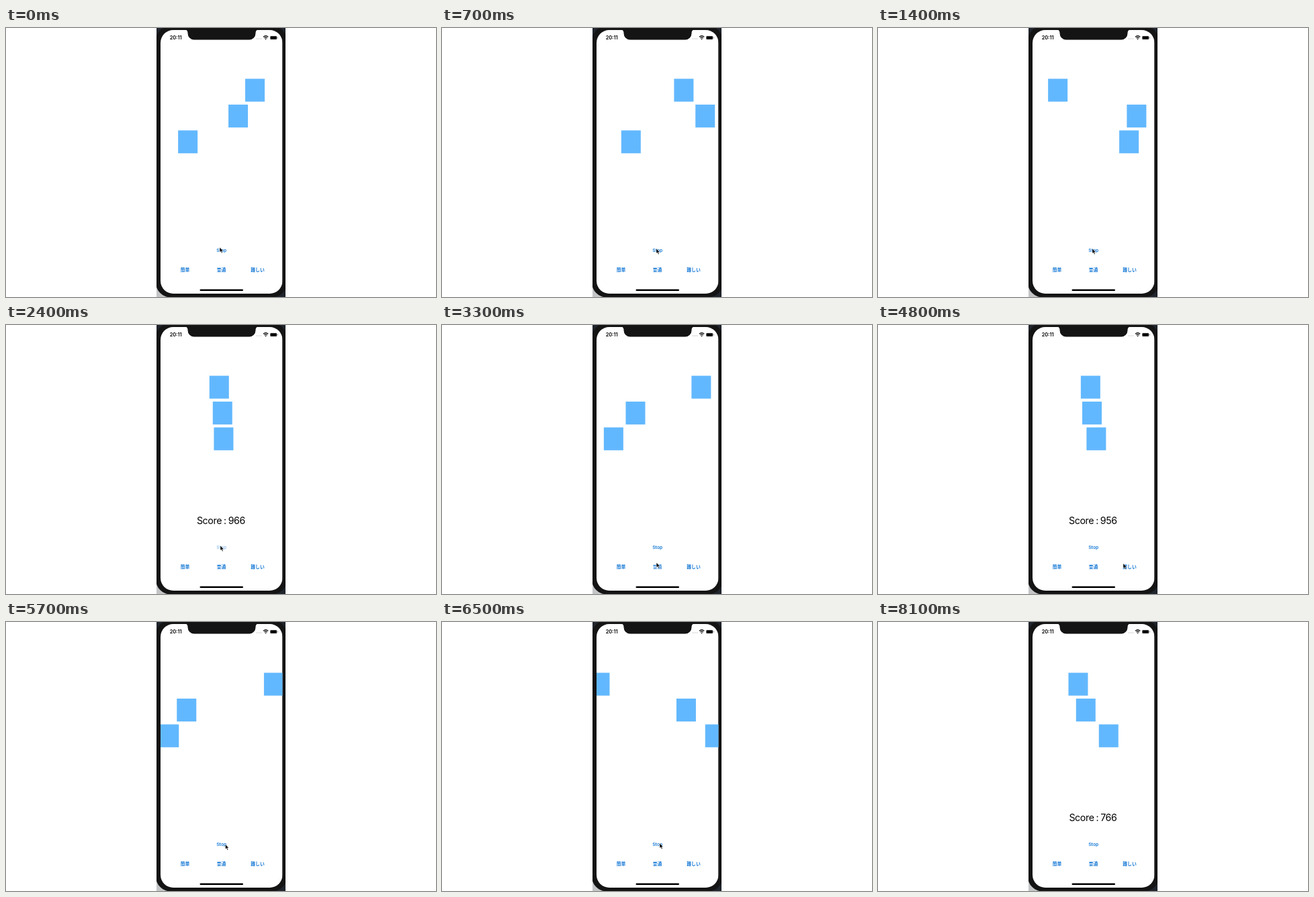
Write an HTML page that moves like this. It is 640 by 400 pixels and loops after 9 s.

```html
<!DOCTYPE html>
<html lang="ja">
<head>
<meta charset="utf-8">
<title>Timing game</title>
<style>
  html, body { margin: 0; width: 100%; height: 100%; overflow: hidden; background: #fff; }
  svg { display: block; width: 640px; height: 400px; }
  text { font-family: Inter, "Noto Sans CJK JP", "Noto Sans CJK", sans-serif; text-anchor: middle; }
  .button { fill: #1679d6; font-size: 6.8px; font-weight: 600; }
  .clock { font-size: 7.4px; font-weight: 600; }
  .score { font-size: 14.2px; letter-spacing: -.4px; word-spacing: -.6px; }
</style>
</head>
<body>
<svg viewBox="0 0 640 400">
  <defs>
    <clipPath id="screen"><rect x="230" y="3" width="181.5" height="392" rx="19"/></clipPath>
    <clipPath id="stage"><rect x="224" width="192" height="400"/></clipPath>
  </defs>
  <g clip-path="url(#stage)">
    <rect x="224" width="192" height="400" fill="#20242c"/>
    <rect x="224" y="380" width="20" height="20" fill="#c4c5c7"/>
    <rect x="223" y="-3" width="195" height="403.500" rx="22" fill="#141414"/>
  </g>
  <g clip-path="url(#screen)">
    <rect x="230" y="3" width="181.500" height="392" fill="#fff"/>
    <path d="M266 2Q270.500 3 270.500 7V8A9.500 9.500 0 0 0 280 17.500H362A9.500 9.500 0 0 0 371.500 8V7Q371.500 3 376 2Z" fill="#141414"/>
    <g id="blocks" fill="#62b8fe"></g>
  </g>

  <text class="clock" x="252.700" y="17">20:11</text>
  <path d="M372.500 16H380.500" stroke="#bbb" stroke-dasharray="1.300 .9"/>
  <path d="M383 13.300Q386.600 10.200 390.200 13.300M384.500 15Q386.600 13.300 388.700 15" fill="none" stroke="#000" stroke-width="1.300"/>
  <path d="M385.500 16.200Q386.600 15.300 387.700 16.200L386.600 17.400Z"/>
  <rect x="392.900" y="11.800" width="10.600" height="5.400" rx="1.500" fill="#bbb"/>
  <rect x="393.500" y="12.300" width="9.400" height="4.400" rx=".8"/>
  <rect x="404" y="13.600" width=".8" height="1.800" fill="#777"/>
  <rect x="288.500" y="388.500" width="64.500" height="2.500" rx="1.250"/>

  <text id="score" class="score" x="319.900" y="296"></text>
  <text id="stop" class="button" x="320.700" y="333.300">Stop</text>
  <text id="easy" class="button" x="266.500" y="362.200">簡単</text>
  <text id="normal" class="button" x="320.500" y="362.200">普通</text>
  <text id="hard" class="button" x="374.500" y="362.200">難しい</text>
  <path id="cursor" d="M0 0V7.300L1.700 5.800L2.900 8.700L4.200 8.100L3 5.400H5.200Z" stroke="#fff" stroke-width=".5"/>
</svg>
<script>
const LOOP = 9000, STEP = 100, EXIT = 8000;
const HALF = 90.75, HOME = 306.1, POINTS_PER_PX = 375 / (2 * HALF);
const byId = id => document.getElementById(id);
const clamp = (v, low, high) => Math.max(low, Math.min(high, v));

// Each round runs from a press on its level to a press on Stop; speed is in px per ms.
const rounds = [
  { level: "easy", from: -379, until: 2350, speed: .1318, pick: [317.5, 325], halt: [319, 328] },
  { level: "normal", from: 3040, until: 4413, speed: .2637, pick: [319, 357], halt: [320, 328] },
  { level: "hard", from: 4998, until: 7135, speed: .67085, pick: [370, 357.5], halt: [324, 329] }
];

const blocks = [1, .5, -1].map((speed, i) => {
  const rect = document.createElementNS("http://www.w3.org/2000/svg", "rect");
  const box = { y: 75.5 + 38.4 * i, width: 29, height: 34 };
  for (const name in box) rect.setAttribute(name, box[name]);
  byId("blocks").append(rect);
  return { rect, speed };
});

// Bounces between -HALF and HALF, passing 0 at the start.
function bounce(distance) {
  const period = 4 * HALF;
  const phase = (((distance + HALF) % period) + period) % period;
  return HALF - Math.abs(phase - 2 * HALF);
}

function offsets(t) {
  const distance = rounds.reduce((sum, r) => sum + r.speed * (clamp(t, r.from, r.until) - r.from), 0);
  return blocks.map(block => bounce(distance * block.speed));
}

function glide(a, b, t, from, until) {
  const p = clamp((t - from) / (until - from), 0, 1);
  const eased = p * p * (3 - 2 * p);
  return a.map((v, i) => v + (b[i] - v) * eased);
}

function pointerAt(t) {
  let tip = rounds[0].pick;
  for (const { from, pick, halt } of rounds) {
    tip = glide(tip, pick, t, from - 600, from - 100);
    tip = glide(tip, halt, t, from + 100, from + 800);
  }
  return glide(tip, [252, 298], t, EXIT - STEP, EXIT);
}

// A pressed label turns pale, then fades back after its release.
function pressOpacity(release, t) {
  return t < release - 100 ? 1 : .35 + .65 * clamp((t - release) / 350, 0, 1);
}

function draw(now) {
  const t = Math.floor((now % LOOP) / STEP) * STEP;
  const spots = offsets(t);
  blocks.forEach(({ rect }, i) => rect.setAttribute("x", HOME + spots[i]));

  const running = rounds.some(r => t >= r.from && t < r.until);
  const miss = spots.reduce((sum, v) => sum + Math.abs(v), 0) * POINTS_PER_PX;
  byId("score").textContent = running ? "" : `Score : ${Math.round(1000 - 2 * miss)}`;

  for (const r of rounds) byId(r.level).setAttribute("opacity", pressOpacity(r.from, t));
  byId("stop").setAttribute("opacity", Math.min(...rounds.map(r => {
    const over = t > r.until + 400;
    return over ? 1 : pressOpacity(r.until, t);
  })));

  const cursor = byId("cursor");
  cursor.setAttribute("transform", `translate(${pointerAt(t).join(" ")})`);
  cursor.setAttribute("visibility", t > EXIT ? "hidden" : "visible");
}

const start = performance.now();
function tick() {
  draw(performance.now() - start);
  requestAnimationFrame(tick);
}
tick();
</script>
</body>
</html>
```
